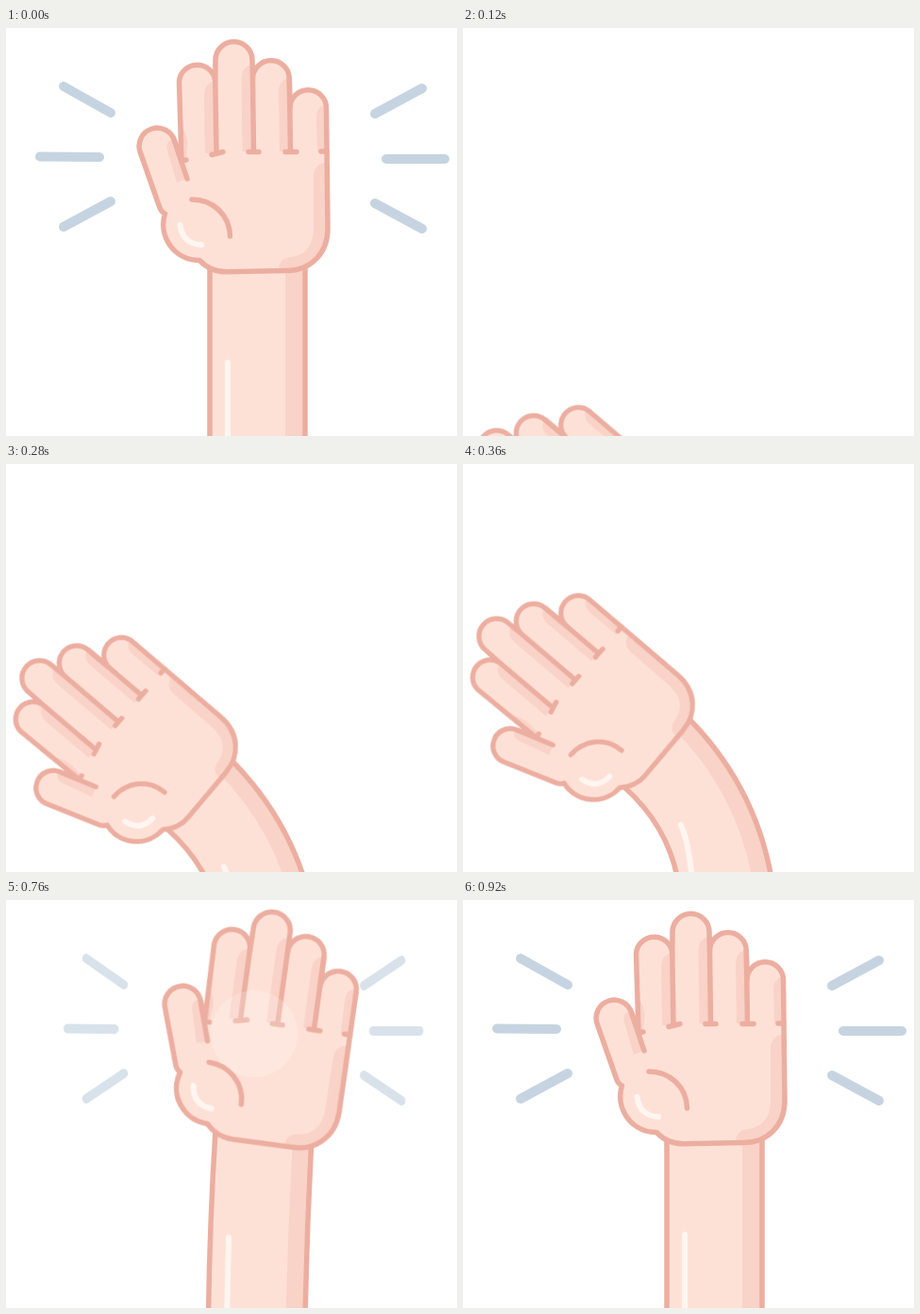
An HTML page without scripts for the animation above (1280 ms loop, 478 px wide and 433 px high).

```html
<!DOCTYPE html>
<html lang="en">
<head>
<meta charset="utf-8">
<title>Raised hand</title>
<style>
  html, body { margin: 0; width: 100%; height: 100%; overflow: hidden; background: #fff; }
  svg { display: block; width: 100%; height: 100%; }

  .skin { fill: #fee1d6; }
  .dark { fill: #f9d2c8; }
  .line { fill: none; stroke: #ecaea0; stroke-width: 5.5; stroke-linecap: round; stroke-linejoin: round; }
  .shine { fill: none; stroke: #fff5f1; stroke-width: 6; stroke-linecap: round; }
  .rays { stroke: #c5d4e0; stroke-width: 10; stroke-linecap: round; }
  .flash { fill: #fff; transform-origin: 263px 142px; }
  .left { transform-origin: 181px 0; }
  .right { transform-origin: 332px 0; }

  /* poses hold for 40 ms each */
  .scene, .hand, .arm, .edge, .glint, .rays, .flash { animation: 1280ms step-end infinite; }
  .scene { animation-name: rise; }
  .hand { animation-name: swing; }
  .arm { animation-name: bend; }
  .edge { animation-name: bend-edge; }
  .glint { animation-name: bend-glint; }
  .rays { animation-name: burst; }
  .flash { animation-name: flash; }

  @keyframes rise {
    0% { transform: none; }
    3.125% { transform: translateY(450px); }
    9.375% { transform: translateY(263px); }
    12.5% { transform: translateY(213px); }
    15.625% { transform: translateY(154px); }
    18.75% { transform: translateY(95px); }
    21.875% { transform: translateY(44.5px); }
    25% { transform: translateY(11.7px); }
    28.125%, 100% { transform: none; }
  }
  @keyframes swing {
    0% { transform: translate(267px, 258px) rotate(0deg) scale(1); }
    3.125% { transform: translate(213.5px, 306px) rotate(-48.8deg) scale(.96); }
    53.125% { transform: translate(237.4px, 286.5px) rotate(-23.4deg) scale(.966); }
    56.25% { transform: translate(257px, 268px) rotate(-6deg) scale(.98); }
    59.375% { transform: translate(273px, 258.2px) rotate(8.7deg) scale(1.003); }
    62.5% { transform: translate(275px, 258px) rotate(10deg) scale(1.04); animation-timing-function: steps(3); }
    71.875%, 100% { transform: translate(267px, 258px) rotate(0deg) scale(1); }
  }
  @keyframes bend {
    0% { d: path("M216 250Q216 345 216 440L317 440Q317 345 317 250Z"); }
    3.125% { d: path("M171 343Q216 383 227.5 440L327 440Q309 338 234 265Z"); }
    53.125% { d: path("M188 303Q215 368 221.5 440L321.5 440Q313 340 280 262Z"); animation-timing-function: steps(2); }
    59.375% { d: path("M222 245Q216 340 214.5 440L317 440Q319 345 324 250Z"); }
    62.5% { d: path("M224 245Q216 340 214.5 440L317 440Q320 345 327 250Z"); animation-timing-function: steps(3); }
    71.875%, 100% { d: path("M216 250Q216 345 216 440L317 440Q317 345 317 250Z"); }
  }
  @keyframes bend-edge {
    0% { d: path("M296 250Q296 345 296 440L317 440Q317 345 317 250Z"); }
    3.125% { d: path("M222 280Q289 346 306.5 440L327 440Q309 338 234 265Z"); }
    53.125% { d: path("M263 272Q293 340 301 440L321.5 440Q313 340 280 262Z"); animation-timing-function: steps(2); }
    59.375% { d: path("M304 250Q299 345 296.5 440L317 440Q319 345 324 250Z"); }
    62.5% { d: path("M306 250Q300 345 296.5 440L317 440Q320 345 327 250Z"); animation-timing-function: steps(3); }
    71.875%, 100% { d: path("M296 250Q296 345 296 440L317 440Q317 345 317 250Z"); }
  }
  @keyframes bend-glint {
    0% { d: path("M235 355Q235 400 235 445"); }
    3.125% { d: path("M231 383Q240 404 243 445"); }
    53.125% { d: path("M231.5 373Q238 408 239 445"); animation-timing-function: steps(2); }
    59.375% { d: path("M236 358Q235 400 234 445"); animation-timing-function: steps(4); }
    71.875%, 100% { d: path("M235 355Q235 400 235 445"); }
  }
  @keyframes burst {
    0% { opacity: 1; transform: none; }
    3.125% { opacity: 0; transform: scaleX(.4); }
    56.25% { opacity: .33; transform: scaleX(.6); }
    59.375% { opacity: .66; transform: scaleX(.8); }
    62.5%, 100% { opacity: 1; transform: none; }
  }
  @keyframes flash {
    0% { opacity: 0; }
    56.25% { opacity: .3; transform: scale(.5); }
    59.375% { opacity: .2; transform: none; }
    62.5% { opacity: .1; transform: scale(1.4); }
    65.625%, 100% { opacity: 0; }
  }
</style>
</head>
<body>
<svg viewBox="0 0 478 433">
  <defs>
    <path id="outline" d="M186 141L183.5 57A19.2 19.2 0 0 1 221.8 57L222 34A19.5 19.5 0 0 1 261 34L261.5 54A19.4 19.4 0 0 1 300.3 54L301 85A19.2 19.2 0 0 1 339.5 85L341 213C341 240 322 257.5 298 257.5L234 258.8Q217 259 205 246.5A38 38 0 0 1 168.5 197Q164 195 162 188L142 131A19 19 0 0 1 178.5 119.5Z"/>
  </defs>

  <g class="rays left">
    <path d="M61 62L111 90M36 136.5L99 137M61 211L111 184"/>
  </g>
  <g class="rays right">
    <path d="M441 64L391 91M465 139H403M441 213L391 186"/>
  </g>

  <g class="scene">
    <path class="arm skin"/>
    <path class="edge dark"/>
    <path class="glint shine"/>
    <path class="arm line"/>

    <g class="hand">
      <g transform="translate(-267 -258)">
        <use href="#outline" class="skin"/>
        <g class="dark">
          <path d="M222 56Q210 58 210 72L211 133H223Z"/>
          <path d="M261 39Q249.500 41 249.500 54L250.500 131H262Z"/>
          <path d="M300.500 53Q289 55 289 68L290 131H301.500Z"/>
          <path d="M339.500 81Q329 83 329 95L330 131H340Z"/>
          <path d="M185 104Q192 110 192.500 124L191 138L186 141Z"/>
          <path d="M178.500 118Q168 119 171 130L181 164L192 160Z"/>
          <path d="M340 142Q326 144 326 158V214Q325 240 302 243Q289 244 289 257.500H298C322 257.500 341 240 341 213Z"/>
        </g>
        <use href="#outline" class="line"/>
        <path class="line" d="M178.500 119.500L192 160M221.800 57L223 133M218 134.500L230 131.500M261.500 54L262.500 131M257 131.500H268M300.300 54L301.500 131M296 131.500H308M334 131H340M188 140.500L191 140"/>
        <path class="line" d="M197 182C219 182 237 198 237.500 221"/>
        <path class="shine" d="M184.500 209Q187 229 207 230"/>
      </g>
    </g>
  </g>

  <circle class="flash" cx="263" cy="142" r="46"/>
</svg>
</body>
</html>
```
